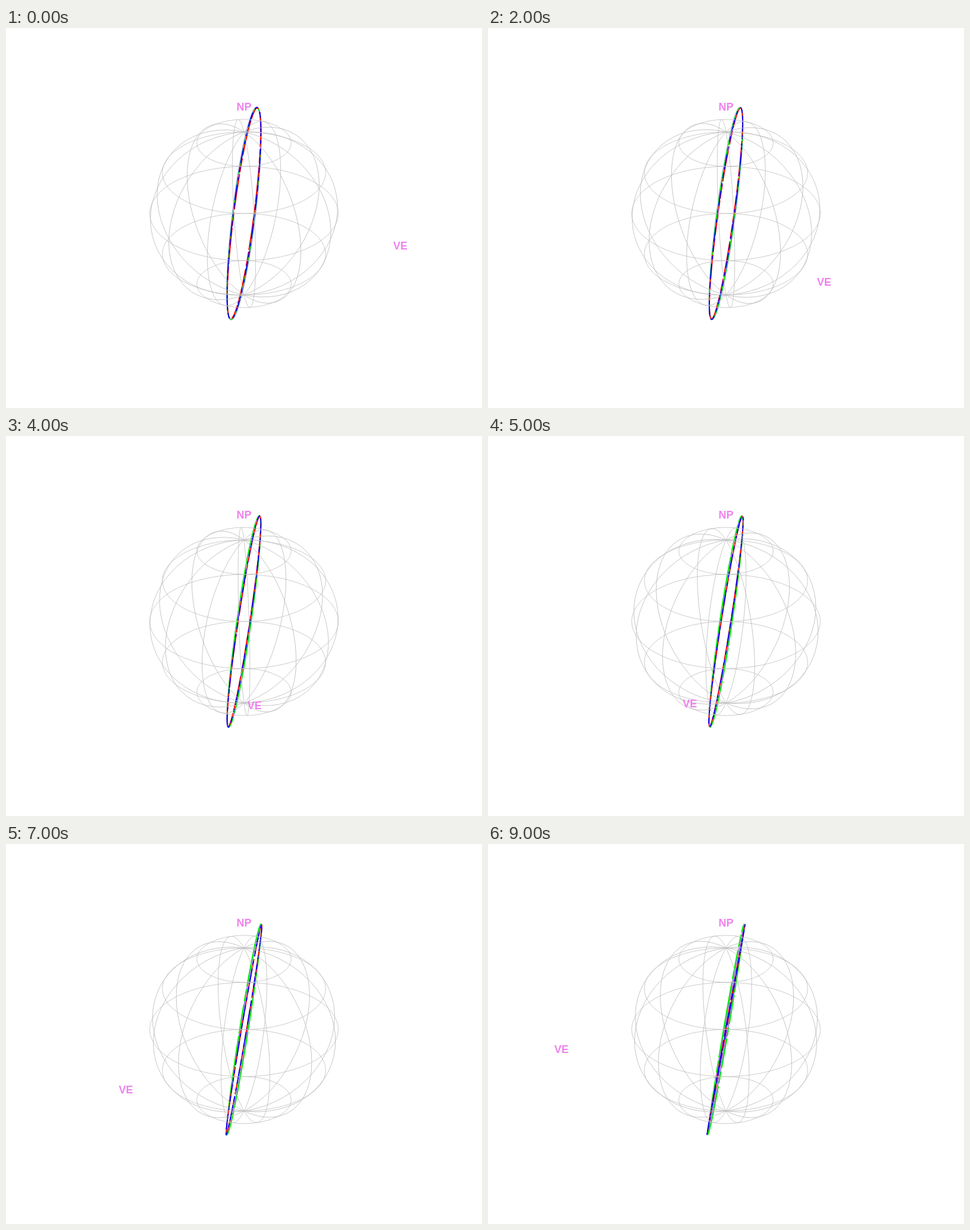
Animation of 800 by 640 pixels, one loop 10000 ms. Source, as an HTML page:

```html
<!DOCTYPE html>
<html lang="en">
<head>
<meta charset="utf-8">
<title>Orbit planes around a globe</title>
<style>
  html, body { margin: 0; width: 100%; height: 100%; overflow: hidden; background: #fff; }
  svg { display: block; width: 800px; height: 640px; }
  ellipse { fill: none; }
  #grid ellipse { stroke: #bebebe; stroke-width: .8; }
  text { font: bold 18px "Liberation Sans", Arial, sans-serif; fill: #ee82ee; text-anchor: middle; }
</style>
</head>
<body>
<svg viewBox="0 0 800 640">
  <g id="rings"></g>
  <g id="grid"></g>
  <text x="400" y="138.8">NP</text>
  <text id="ve">VE</text>
</svg>
<script>
const CX = 400, CY = 312.4, R = 158.5;
const STEP = 1000, STEPS = 10;
const RAD = Math.PI / 180;
const COS = Math.cos(30 * RAD), SIN = 0.5;   // camera elevation of 30 degrees
const COS_INC = -0.156;                      // orbit inclination near 99 degrees

// Half widths (px) of each orbit at the first and the last step.
const orbits = [
  { color: '#9b78f0', r: 180, from: 18.9, to: 2.8, width: 2.2, dash: 'none', shift: 0 },
  { color: '#00f000', r: 179.8, from: 18.1, to: 4, width: 2, dash: '130 4 50 6 20 5', shift: 61 },
  { color: '#ff0000', r: 179, from: 16.9, to: 0.7, width: 1.9, dash: '60 3 24 5', shift: 23 },
  { color: '#0000ff', r: 180.2, from: 17.9, to: 0.4, width: 1.8, dash: '10 5 26 7 6 8', shift: 37 }
];

function addEllipse(parent, attrs) {
  const el = document.createElementNS('http://www.w3.org/2000/svg', 'ellipse');
  set(el, { cx: CX, cy: CY, ...attrs });
  return document.getElementById(parent).appendChild(el);
}

function set(el, attrs) {
  for (const name in attrs) el.setAttribute(name, attrs[name]);
}

// Projects a circle around the centre, given its normal (x right, y up, z to viewer).
function project(el, r, nx, ny, nz) {
  const tilt = Math.atan2(-ny, nx) / RAD;
  set(el, { rx: Math.max(r * Math.abs(nz), 0.01), ry: r, transform: `rotate(${tilt} ${CX} ${CY})` });
}

for (const lat of [-60, -30, 0, 30, 60]) {
  const r = R * Math.cos(lat * RAD);
  addEllipse('grid', { cy: CY - R * Math.sin(lat * RAD) * COS, rx: r, ry: r * SIN });
}
const meridians = Array.from({ length: 6 }, () => addEllipse('grid', {}));

for (const o of orbits) {
  o.el = addEllipse('rings', { stroke: o.color, 'stroke-width': o.width, 'stroke-dasharray': o.dash });
}

const ve = document.getElementById('ve');

function draw(step) {
  const lon = 67.1 - 15.88 * step;

  meridians.forEach((el, i) => {
    const a = (lon + 30 * i + 90) * RAD;
    project(el, R, Math.sin(a), -SIN * Math.cos(a), COS * Math.cos(a));
  });

  for (const o of orbits) {
    const nz = -(o.from + (o.to - o.from) * step / (STEPS - 1)) / o.r;
    const ny = (COS_INC - SIN * nz) / COS;
    project(o.el, o.r, Math.sqrt(1 - ny * ny - nz * nz), ny, nz);
    set(o.el, { 'stroke-dashoffset': o.shift * step });
  }

  set(ve, {
    x: CX + 285.3 * Math.sin(lon * RAD),
    y: 317.3 + 285.3 * SIN * Math.cos(lon * RAD)
  });
}

const start = performance.now();
let shown = -1;
function tick() {
  const step = Math.floor((performance.now() - start) / STEP) % STEPS;
  if (step !== shown) draw(shown = step);
  requestAnimationFrame(tick);
}
tick();
</script>
</body>
</html>
```
